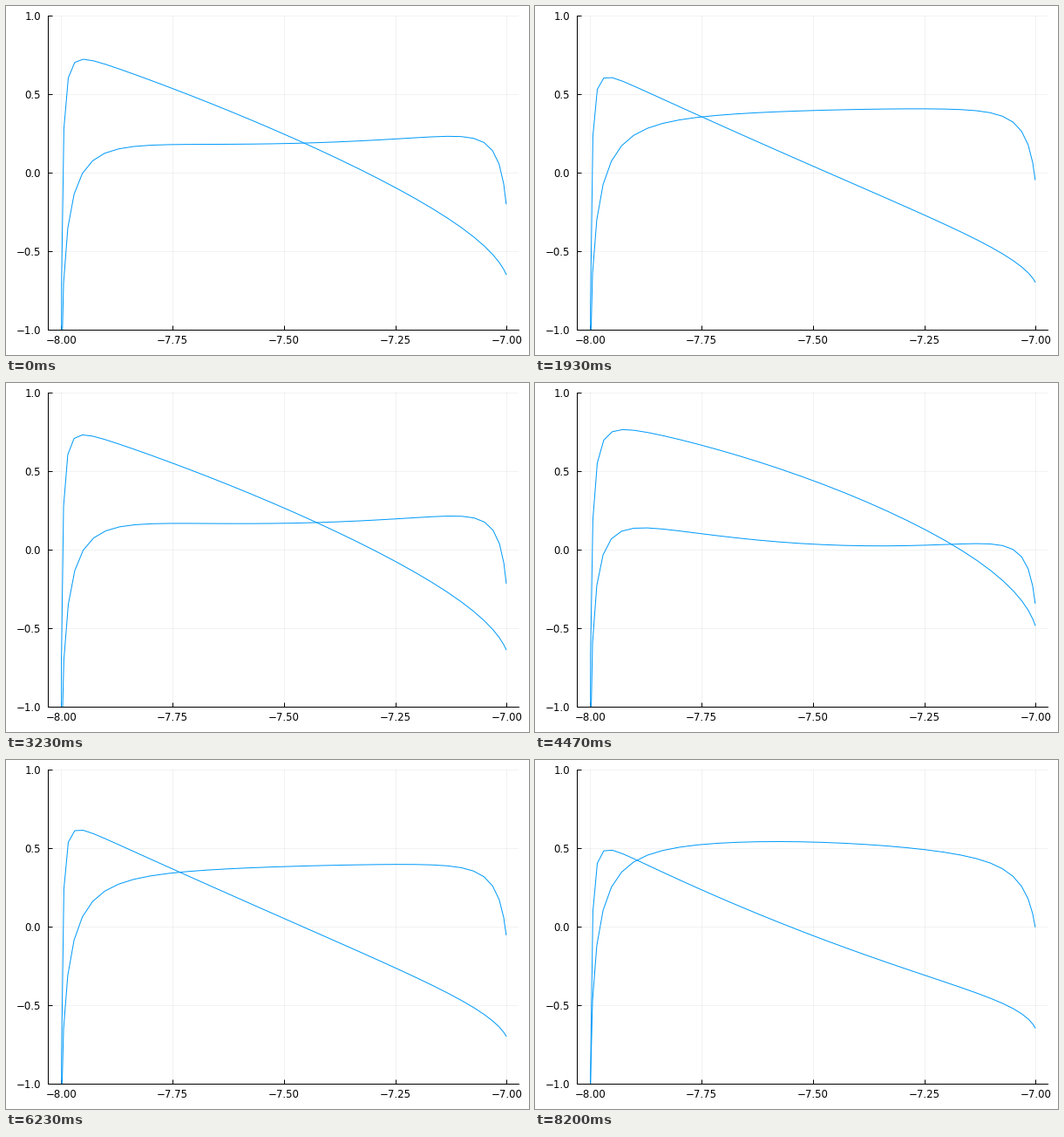
A matplotlib script for the animation above (8230 ms loop, 600 px wide and 400 px high).

```python
import numpy as np
import matplotlib.pyplot as plt
from matplotlib.animation import FuncAnimation

W, H, DPI = 600, 400, 100
PX = 72 / DPI              # one pixel in points
STEPS, LOOP_MS = 247, 8230
TICKS = 2 * STEPS          # two draws per step keep the step times exact
PERIOD = 64.3              # steps per oscillation
NODES = 32


def wave(phase, shift=0.0, harmonic=1):
    return np.cos(2 * np.pi * harmonic * (phase - shift))


def grid(left, right):
    """Cosine-spaced offsets from the left wall, 0 to 1."""
    k = np.arange(NODES)
    return np.sin(np.pi * (k + left) / (NODES - 1 + left + right) / 2) ** 2


def profile(d, phase):
    """Oscillating bulk minus a boundary layer at each wall."""
    k = np.arange(NODES)
    bulk = (0.532 - 0.58 * d
            + (0.28 - 0.36 * d - 0.27 * d**2) * wave(phase)
            + (0.10 + 0.78 * d - 0.55 * d**2) * wave(phase, 0.25)
            + 0.025 * wave(phase, 0.207, 2))
    rate = 0.72 * np.exp(0.53 * wave(phase, 0.893))
    left = 1.5 * np.exp(-rate * k)
    depth = 0.32 + 0.15 * wave(phase, 0.405) + 0.045 * wave(phase, 0.06, 2)
    reach = 3.7 * np.exp(0.42 * wave(phase, 0.02))
    right = depth * np.exp(-((NODES - 1 - k) / reach) ** 1.3)
    return bulk - left - right


fig = plt.figure(figsize=(W / DPI, H / DPI), dpi=DPI, facecolor="white")
L, R, T, B = 48.2, 588.2, 11.4, 371.3
X0, UNIT = 63.3, 511       # pixel of x = -8, pixels per unit
ax = fig.add_axes([L / W, 1 - B / H, (R - L) / W, (B - T) / H])
ax.set_xlim(-8 + (L - X0) / UNIT, -8 + (R - X0) / UNIT)
ax.set_ylim(-1, 1)

xt, yt = np.linspace(-8, -7, 5), np.linspace(-1, 1, 5)
ax.set_xticks(xt, [f"{v:.2f}".replace("-", "\u2212") for v in xt])
ax.set_yticks(yt, [f"{v:.1f}".replace("-", "\u2212") for v in yt])
ax.tick_params(direction="in", length=5 * PX, width=PX, color="black")
ax.tick_params(axis="x", pad=5.5 * PX)
ax.tick_params(axis="y", pad=8 * PX)
for label in ax.get_xticklabels() + ax.get_yticklabels():
    label.set(fontfamily="DejaVu Sans", fontsize=11.8 * PX)
ax.grid(color="black", alpha=0.05, linewidth=PX)
ax.set_axisbelow(True)
for side in ("top", "right"):
    ax.spines[side].set_visible(False)
for side in ("left", "bottom"):
    ax.spines[side].set_linewidth(PX)

# Two curves in antiphase, on slightly different grids
curves = [(ax.plot([], [], color="#009afa", lw=PX)[0], d, lead)
          for d, lead in ((grid(0.6, 0.6), 0.0), (grid(0.5, 0.65), 0.5))]

# Steps start on whole centiseconds: 0, 30, 70, 100, ...
starts = np.round(np.arange(STEPS) * 10 / 3) * 10
tick_ends = np.arange(1, TICKS + 1) * LOOP_MS / TICKS
step_at = np.searchsorted(starts, tick_ends) - 1


def draw(i):
    phase = step_at[i] / PERIOD
    for line, d, lead in curves:
        y = profile(d, phase + lead)
        line.set_data(np.r_[-8, d - 8], np.r_[-3, y])
    return [c[0] for c in curves]


anim = FuncAnimation(fig, draw, frames=TICKS, interval=LOOP_MS / TICKS,
                     repeat=True, repeat_delay=0)
plt.show()
```
